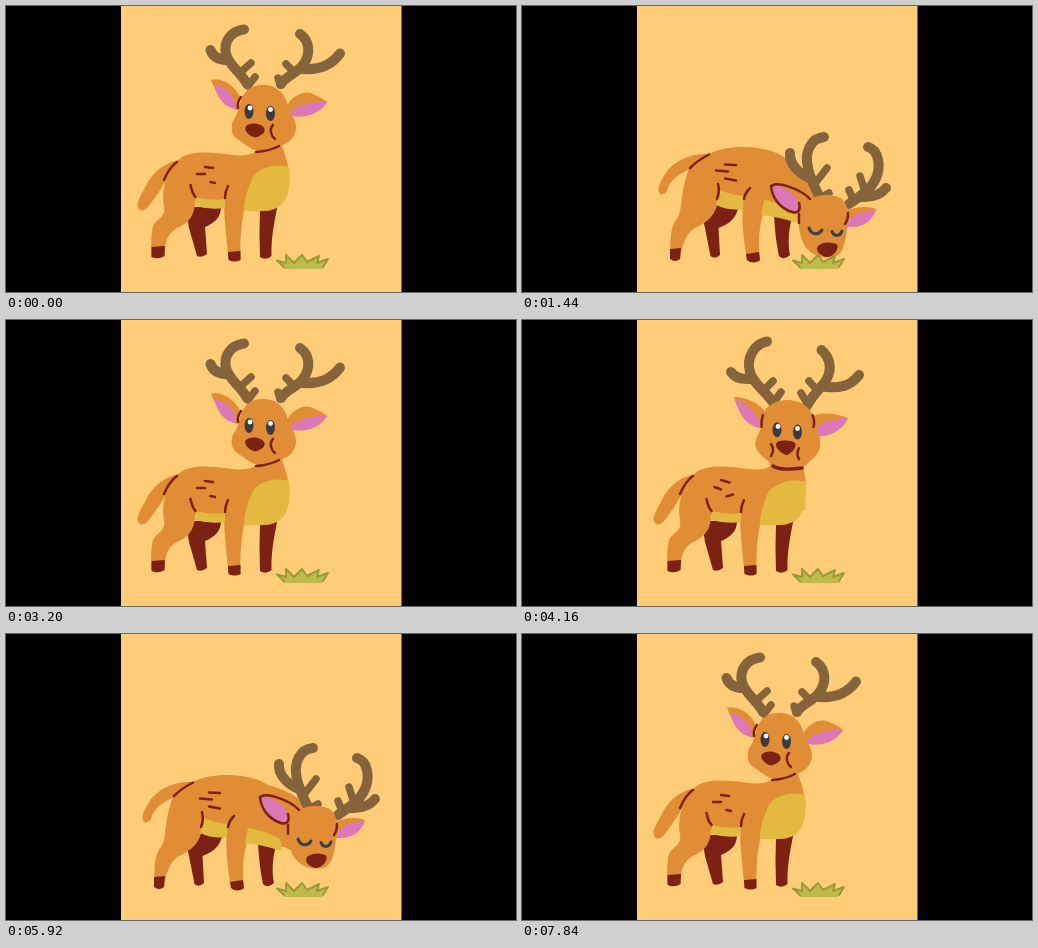
These frames come from a looping animation (510 px wide and 286 px high, 7920 ms). An HTML page:

```html
<!DOCTYPE html>
<html lang="en">
<head>
<meta charset="utf-8">
<title>Grazing deer</title>
<style>
  html, body { margin: 0; width: 100%; height: 100%; overflow: hidden; background: #000; }
  svg { display: block; width: 100%; height: 100%; }
  .fur { fill: #e18d36; }
  .dark { fill: #7d2114; }
  .cream { fill: #e3ba3f; }
  .pink { fill: #dc78b8; }
  .eye { fill: #3b3b40; }
  .shine { fill: #fff; }
  .antler, .line, .lid { fill: none; stroke-linecap: round; stroke-linejoin: round; }
  .antler { stroke: #86643b; stroke-width: 10; }
  .tine { stroke-width: 7.5; }
  .line { stroke: #7d2114; stroke-width: 2.5; }
  .collar { stroke-width: 3.4; }
  .lid { stroke: #3b3f48; stroke-width: 3; }
  .grass { fill: #bfba4c; }
  .blade { fill: none; stroke: #9a9a36; stroke-width: 2; stroke-linejoin: round; stroke-linecap: round; }

  /* Twelve equal beats: look, lift, bite, lift, bite, lift, look, chew x5 */
  .pose { visibility: hidden; animation: 3960ms step-end -3855ms infinite; }
  .look { animation-name: look; }
  .lift { animation-name: lift; }
  .bite { animation-name: bite; }
  .chew { animation-name: chew; }
  .gulp { animation-name: gulp; }
  @keyframes look {
    0%, 50% { visibility: visible; }
    8.3333%, 58.3333%, 100% { visibility: hidden; }
  }
  @keyframes lift {
    0%, 16.6667%, 33.3333%, 50%, 100% { visibility: hidden; }
    8.3333%, 25%, 41.6667% { visibility: visible; }
  }
  @keyframes bite {
    0%, 25%, 41.6667%, 100% { visibility: hidden; }
    16.6667%, 33.3333% { visibility: visible; }
  }
  @keyframes chew {
    0%, 66.6667%, 83.3333% { visibility: hidden; }
    58.3333%, 75%, 91.6667%, 100% { visibility: visible; }
  }
  @keyframes gulp {
    0%, 75%, 91.6667%, 100% { visibility: hidden; }
    66.6667%, 83.3333% { visibility: visible; }
  }
</style>
</head>
<body>
<svg viewBox="0 0 510 286" preserveAspectRatio="none">
  <defs>
    <g id="stand">
      <path class="dark" d="M181 209L188 201H215C215 211 209 217 199 221L201 248Q196 252 191 250L183 222Z"/>
      <path class="dark" d="M254 203L271 202C268 218 265 232 265.500 250Q260 255 254 251Q253 226 254 203Z"/>
      <path class="fur" d="M173 154C158 157 149 165 142 176C137 186 132 193 131.500 199C132 206 138 206 142 201C149 192 156 182 162 170Z"/>
      <path class="fur" d="M171 155C180 146 195 146 210 147C226 149 243 152 250 145L276 140C279 150 284 160 283 176C283 192 275 203 262 205H238C235 220 234 236 234.500 254Q229 257 222.500 253C221 235 218 215 218 195H189C189 212 180 218 171 222C160 228 159 238 158.500 250Q152 253 145.500 250C145 238 145 228 147 220C151 212 160 212 158 200C156 190 158 180 160 173C162 165 166 159 171 155Z"/>
      <path class="cream" d="M283 161C270 157 253 161 247 171C242 182 238 192 238 205C252 206 268 205 275 199C283 192 285 175 283 161Z"/>
      <path class="cream" d="M190 191Q204 195 219 193V202Q204 204 189 200Z"/>
      <path class="dark" d="M145.500 241L159 240L158.500 250Q152 254 145.500 251Z"/>
      <path class="dark" d="M222 246L234.500 245V254Q229 257 222.500 254Z"/>
      <path class="line" d="M171 156C165 160 161 167 158 174M184.500 179Q186 187 189.500 191M222 180Q219 186 219 192"/>
    </g>

    <g id="graze">
      <path class="dark" d="M180 209L196 199L216 203C213 214 206 218 196.500 222L198 249Q193 254 188.500 250L183 222Z"/>
      <path class="dark" d="M252 209L270 212C266 225 266 240 268 249Q262 255 257 250C254 235 253 225 252 209Z"/>
      <path class="fur" d="M187 148C168 147 153 155 145 165C140 173 136 179 136.500 185C138 190 142 189 145 185C147 175 157 166 175 161Z"/>
      <path class="fur" d="M167 163C178 150 195 141 220 141C245 141 262 148 270 158C283 168 296 185 298 200L278 213C266 211 252 209 241 208C237 222 236 236 238 255Q231 258 225 254C222 235 219 215 221 196L196 193C195 208 186 216 173 222C163 228 160 240 158 253Q153 256 148 252C149 236 147 222 155 213C161 205 158 185 167 163Z"/>
      <path class="cream" d="M197 184Q210 189 222 190L221 203Q207 205 194 199Z"/>
      <path class="cream" d="M242 194C253 196 266 200 276 206L275 217Q258 211 239 209Z"/>
      <path class="dark" d="M148 243L159 242L158 253Q153 257 148 253Z"/>
      <path class="dark" d="M224 248L237 246L238 254Q231 259 225 254Z"/>
      <path class="line" d="M187 148.500Q176 154 168 162M196 178Q198 186 195 193M228 182Q223 187 222 193M203 158.500L214 159M194 164.500L206 165.500M203 172.500L214 174.500"/>
    </g>

    <g id="grazeHead">
      <path class="antler" d="M302 131C289 132 282 146 286 162C288 173 293 181 297 190M268 147C267 157 276 168 290 173"/>
      <path class="antler tine" d="M305 162L295 175M307 187L298 192"/>
      <path class="antler" d="M346 141C357 144 359 161 354 172C349 184 338 190 327 198M364 182Q356 192 340 191"/>
      <path class="antler tine" d="M338 170L343 186M327 184L332 196"/>
      <path class="fur" d="M323 205C335 200 348 200 354 203C350 216 339 222 324 221Z"/>
      <path class="pink" d="M326 216C332 207 343 205 354 204C350 216 339 222 325 221Z"/>
      <path class="fur" d="M248 181C253 173 278 182 288 193C296 188 314 187 321 194C329 203 326 219 324 230C322 242 319 249 312 251C300 253 290 250 283 240C278 232 276 222 277 207Z"/>
      <path class="pink" d="M249 180C258 178 273 187 277 197C279 204 276 208 270 206C257 202 250 191 249 180Z"/>
      <path class="line" d="M249 181C253 174 279 183 288 193M249 180C250 191 257 202 270 206C276 208 279 204 277 197M277 208V217M326 207Q326 214 323 218"/>
      <path class="lid" d="M287 222C289 229 297 229.500 300 224M310 225.500C312 231 318 230.500 320 225"/>
      <path class="dark" d="M296 240C301 235 313 236 315.500 239C317 245 309 252 304 251C298 249 293 245 296 240Z"/>
    </g>

    <g id="chewTop">
      <path class="antler" d="M238 23.500C225 25 217 36 220 48C223 60 235 66 241 78M204.500 44Q208 54 222 54"/>
      <path class="antler tine" d="M245 57L236 65M249 71L242 80"/>
      <path class="antler" d="M294 28C304 35 305 48 297 59C291 67 280 70 275 78M334 47.500C325 60 312 64 297 63"/>
      <path class="antler tine" d="M280 58L288 66M272 72L274 79"/>
      <path class="fur" d="M205 74C214 71 228 78 234 91L231 104C220 100 210 87 205 74Z"/>
      <path class="pink" d="M208 79C218 80 230 90 230 103C219 102 211 92 208 79Z"/>
      <path class="fur" d="M281 100C287 88 300 84 307 88Q315 91 321 96C314 107 302 113 283 109Z"/>
      <path class="pink" d="M283 107C293 98 306 96 321 95.500C316 106 300 114 283 109Z"/>
    </g>

    <g id="chewEyes">
      <path class="line" d="M235 91Q231 96 232 102M250 146Q264 145 273 140"/>
      <ellipse class="eye" cx="243" cy="105.500" rx="4.500" ry="7.500"/>
      <ellipse class="eye" cx="264.500" cy="107.500" rx="4.500" ry="7.500"/>
      <circle class="shine" cx="244" cy="102" r="2.400"/>
      <circle class="shine" cx="264.500" cy="103.500" r="2.400"/>
    </g>
    <path id="nose" class="dark" d="M240 120C245 116 255 117 258 122C261 126 254 131 249 131.500C243 130 237 124 240 120Z"/>
    <path id="spots" class="line" d="M199 161L207 162M191 168L199 168M204.500 176L209 177"/>
  </defs>

  <rect x="115" width="280.500" height="286" fill="#ffcc78"/>

  <g class="pose chew">
    <use href="#stand"/>
    <use href="#spots"/>
    <use href="#chewTop"/>
    <path class="fur" d="M236 92C240 82 250 78 260 79C272 80 279 88 282 100C284 108 291 114 290 123C289 131 283 137 277 139C268 146 256 147 246 143C240 139 236 136 231 133C224 128 224 117 230 110C233 104 233 98 236 92Z"/>
    <use href="#chewEyes"/>
    <use href="#nose"/>
    <path class="line" d="M267 119C263 123 265 130 269 133"/>
  </g>

  <g class="pose gulp">
    <use href="#stand"/>
    <use href="#spots"/>
    <use href="#chewTop"/>
    <path class="fur" d="M236 92C240 82 250 78 260 79C272 80 279 88 282 100C284 108 289 114 288 122C287 130 281 136 275 139C266 146 255 147 245 143C239 140 234 137 229 133C222 128 223 117 230 110C233 104 233 98 236 92Z"/>
    <use href="#chewEyes"/>
    <use href="#nose" x="-1" y="1"/>
    <path class="line" d="M265 120C262 124 263 130 267 133"/>
  </g>

  <g class="pose look">
    <use href="#stand"/>
    <path class="line" d="M199 160L207.500 162.500M192.500 167L199 169.500M204.500 176.500L211 174.500"/>
    <path class="fur" d="M248 144H281L284 164L250 168Z"/>
    <path class="cream" d="M284 162C270 158 254 162 248 172L252 190H283Z"/>
    <path class="antler" d="M245 21.500C232 24 224 38 228 52C231 64 246 73 252 84M209 52Q214 60 229 59"/>
    <path class="antler tine" d="M251 61L243 69M259 72L252 82"/>
    <path class="antler" d="M299.500 30C310 39 310 53 302 63C296 71 289 77 285 86M337 55C328 67 317 68 304 67"/>
    <path class="antler tine" d="M287 61L295 70M279 73L285 83"/>
    <path class="fur" d="M212 77C224 77 237 83 243 92L239 108C227 105 216 92 212 77Z"/>
    <path class="pink" d="M213 79C224 84 238 94 238 108C226 106 217 96 213 79Z"/>
    <path class="fur" d="M290 97C300 91 315 94 326 98C320 111 306 118 291 116Z"/>
    <path class="pink" d="M291 116C294 104 308 98 326 98C320 111 306 118 291 116Z"/>
    <path class="fur" d="M243 90C250 82 258 80 267 80C280 81 290 88 292 100C293 108 300 116 298 127C296 137 288 140 284 145C275 152 258 151 250 146C247 140 237 136 234 128C231 120 238 114 239 107C240 100 240 95 243 90Z"/>
    <path class="line" d="M241 95Q239 100 239.500 107M290.500 95Q293 100 291.500 107M249 124Q253 130 249 136M277 128Q274 134 277 139"/>
    <path class="line collar" d="M251 146Q258 151 280 148"/>
    <ellipse class="eye" cx="255" cy="109.800" rx="4.500" ry="7.500"/>
    <ellipse class="eye" cx="275.500" cy="112" rx="4.500" ry="7.500"/>
    <circle class="shine" cx="256" cy="106.500" r="2.400"/>
    <circle class="shine" cx="275.500" cy="108.500" r="2.400"/>
    <path class="dark" d="M255 122C260 120 270 120 273 123C276 127 268 135 264 135C260 134 251 127 255 122Z"/>
  </g>

  <g class="pose bite">
    <use href="#graze"/>
    <use href="#grazeHead"/>
  </g>

  <g class="pose lift">
    <use href="#graze"/>
    <path class="fur" d="M255 150C285 155 305 170 312 190L298 222L276 212Z"/>
    <use href="#grazeHead" x="5" y="-17"/>
  </g>

  <path class="grass" d="M271 254L279 256L280 248L288 256L296 248L301 256L313 250L311 257L322 253L316 263H278Z"/>
  <path class="blade" d="M278 261L271 254.500L280 257L280 249L288 257L296 249L301 256L313 250L311 257L322 253L317 261"/>
</svg>
</body>
</html>
```
